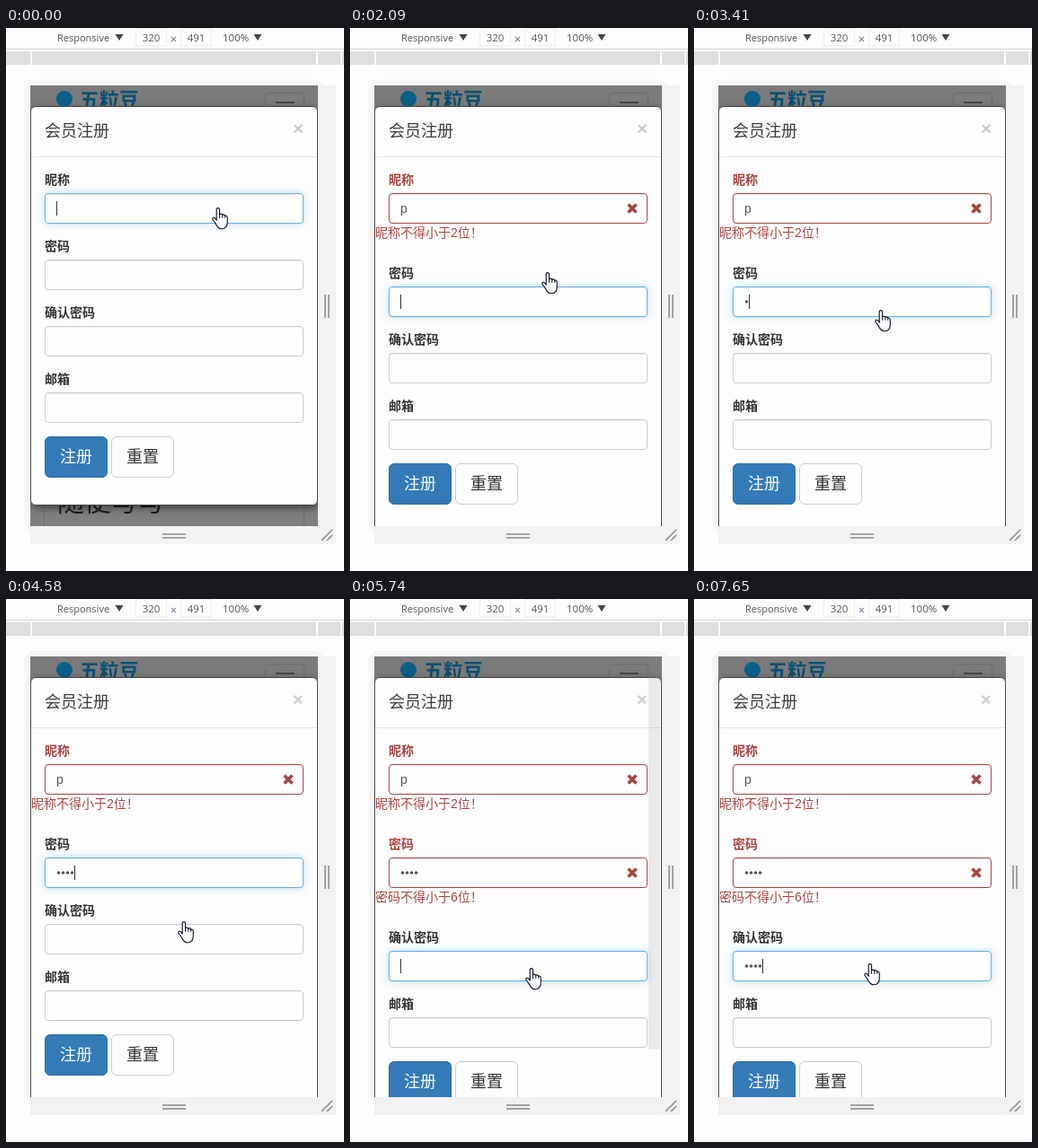
An HTML page with a canvas that plays this animation: 376 by 605 pixels, repeating every 8000 ms.

```html
<!DOCTYPE html>
<html lang="zh-CN">
<head>
<meta charset="utf-8">
<title>会员注册</title>
<style>
html, body { margin: 0; width: 100%; height: 100%; overflow: hidden; background: #fdfdfd; }
canvas { display: block; }
</style>
</head>
<body>
<canvas id="stage" width="376" height="605"></canvas>
<script>
const ctx = document.getElementById('stage').getContext('2d');
const LOOP = 8000, BLINK = 520;
const CJK = '"Liberation Sans", "Noto Sans CJK SC", "Noto Sans CJK", sans-serif';
const UI = '"Open Sans", "Noto Sans", sans-serif';
const PAPER = '#fdfdfd', RED = [169, 68, 66], BLUE = [102, 175, 233], GREY = [204, 204, 204];
const SCREEN = { x: 27, y: 64, w: 320, h: 491 };

// Each field: time of focus, first key, time between keys, key count, caret step
const FIELDS = [
  { label: '昵称', error: '昵称不得小于2位！', focus: 0, key: 510, gap: 0, count: 1, step: 8 },
  { label: '密码', error: '密码不得小于6位！', focus: 1960, key: 3170, gap: 427, count: 4, step: 5 },
  { label: '确认密码', focus: 5230, key: 6260, gap: 420, count: 4, step: 5 },
  { label: '邮箱', focus: Infinity, key: Infinity, gap: 0, count: 0, step: 0 }
];

// Where the hand turns or rests: time, x, y
const STOPS = [
  [0, 229, 200], [510, 217, 271], [1560, 213, 274], [2090, 213, 272], [2600, 201, 356],
  [2850, 194, 324], [3540, 202, 313], [4400, 202, 313], [4580, 191, 359], [4820, 187, 382],
  [5230, 184, 375], [5600, 195, 411], [6260, 191, 411], [7650, 189, 406]
];

const clamp = v => Math.max(0, Math.min(1, v));
const smooth = k => k * k * (3 - 2 * k);
const rgb = c => `rgb(${c.map(Math.round).join(',')})`;
const mix = (a, b, k) => a.map((v, i) => v + (b[i] - v) * k);

function typedCount(f, t) {
  if (t < f.key) return 0;
  return f.gap ? Math.min(f.count, 1 + Math.floor((t - f.key) / f.gap)) : f.count;
}
function caretOn(f, t) {
  const n = typedCount(f, t);
  const last = n ? f.key + (n - 1) * f.gap : f.focus;
  return Math.floor((t - last) / BLINK) % 2 === 0;
}
function handAt(t) {
  const next = STOPS.findIndex(s => s[0] > t);
  if (next < 0) return STOPS[STOPS.length - 1].slice(1);
  const a = STOPS[next - 1], b = STOPS[next];
  return mix(a, b, smooth((t - a[0]) / (b[0] - a[0]))).slice(1).map(Math.round);
}

function rect(x, y, w, h, color) {
  ctx.fillStyle = color;
  ctx.fillRect(x, y, w, h);
}
function box(x, y, w, h, r, fill, stroke) {
  ctx.beginPath();
  ctx.roundRect(x + .5, y + .5, w - 1, h - 1, Math.max(0, r - .5));
  if (fill) { ctx.fillStyle = fill; ctx.fill(); }
  if (stroke) { ctx.strokeStyle = stroke; ctx.lineWidth = 1; ctx.stroke(); }
}
function text(s, x, y, font, color, align = 'left') {
  ctx.font = font;
  ctx.fillStyle = color;
  ctx.textAlign = align;
  ctx.fillText(s, x, y);
}
function line(x1, y1, x2, y2, color, width) {
  ctx.strokeStyle = color;
  ctx.lineWidth = width;
  ctx.beginPath();
  ctx.moveTo(x1, y1);
  ctx.lineTo(x2, y2);
  ctx.stroke();
}
function disc(x, y, r, color) {
  ctx.fillStyle = color;
  ctx.beginPath();
  ctx.arc(x, y, r, 0, Math.PI * 2);
  ctx.fill();
}
function triangle(x, y) {
  ctx.fillStyle = '#444';
  ctx.beginPath();
  ctx.moveTo(x, y);
  ctx.lineTo(x + 9, y);
  ctx.lineTo(x + 4.5, y + 7);
  ctx.fill();
}

function toolbar() {
  rect(0, 0, 376, 605, PAPER);
  text('Responsive', 57, 15, '11px ' + UI, '#555');
  triangle(121.5, 7);
  for (const [size, x] of [['320', 144], ['491', 194]]) {
    box(x, 0, 35, 20, 0, null, '#eee');
    text(size, x + 17.5, 15, '11.5px ' + UI, '#555', 'center');
  }
  text('×', 186.5, 17, '13px ' + UI, '#7c5a86', 'center');
  text('100%', 241, 15, '11.5px ' + UI, '#555');
  triangle(275.5, 7);
  rect(0, 23, 376, 1, '#d0d0d0');
  rect(0, 26, 376, 15, '#dedede');
  for (const x of [27, 345, 372]) rect(x, 26, 2, 15, PAPER);
}

function frame() {
  box(20, 57, 334, 505, 12, '#f5f5f5');
  rect(347, 64, 20, 511, '#f2f2f2');
  rect(27, 555, 340, 20, '#f2f2f2');
  for (const d of [0, 4]) {
    line(355 + d, 297, 355 + d, 323, '#a0a0a0', 2);
    line(174, 564 + d, 200, 564 + d, '#a0a0a0', 2);
    line(351 + d * 1.5, 571, 363, 559 + d * 1.5, '#8c8c8c', 1.6);
  }
}

function backdrop() {
  rect(SCREEN.x, SCREEN.y, SCREEN.w, SCREEN.h, '#7e7e7e');
  rect(SCREEN.x, SCREEN.y, SCREEN.w, 50, '#7b7b7b');
  disc(65, 79, 9, '#0a5f88');
  text('五粒豆', 82, 88, 'bold 22px ' + CJK, '#0a4f72');
  box(288, 72, 44, 34, 4, null, '#6b6b6b');
  rect(300, 82, 21, 2, '#444');
  box(42, 490, 290, 90, 3, null, '#707070');
  text('随便写写', 57, 538, '30px ' + CJK, '#1b1b1b');
}

function field(label, y, glow, error) {
  text(label, 43, y - 10, 'bold 14px ' + CJK, error ? rgb(RED) : '#333');
  ctx.save();
  if (glow) {
    ctx.shadowColor = `rgba(${BLUE},${.5 * glow})`;
    ctx.shadowBlur = 8;
  }
  box(43, y, 288, 34, 4, PAPER);
  ctx.restore();
  rect(46, y + 1, 282, 1, 'rgba(0,0,0,.05)');
  box(43, y, 288, 34, 4, null, rgb(mix(error ? RED : GREY, BLUE, glow)));
  if (error) {
    for (const d of [-4.5, 4.5]) line(314 - d, y + 12.5, 314 + d, y + 21.5, rgb(RED), 3.6);
    text(error, 28, y + 49, '14px ' + CJK, rgb(RED));
  }
}

function button(label, x, y, font, fill, border, color) {
  box(x, y, 70, 46, 6, fill, border);
  text(label, x + 35, y + 29, font + CJK, color, 'center');
}

function modal(t, active) {
  const shift = active * 30;
  const since = t - FIELDS[active].focus;
  const fade = active ? smooth(clamp((since + 45) / 150)) : 1;
  const top = i => 184 + 74 * i + 30 * Math.min(i, active);

  ctx.save();
  ctx.shadowColor = 'rgba(0,0,0,.5)';
  ctx.shadowBlur = 9;
  ctx.shadowOffsetY = 3;
  box(27, 87, 320, 445 + shift, 6, PAPER);
  ctx.restore();
  box(27, 87, 320, 445 + shift, 6, PAPER, '#484848');

  text('会员注册', 43, 121, '18px ' + CJK, '#3c3c3c');
  text('×', 325, 118.5, 'bold 21px ' + CJK, '#ccc', 'center');
  rect(28, 143, 318, 1, '#e5e5e5');

  FIELDS.forEach((f, i) => {
    const y = top(i), n = typedCount(f, t);
    const glow = i === active ? fade : i === active - 1 ? 1 - fade : 0;
    field(f.label, y, glow, i < active && f.error);
    if (i === 0 && n) text('p', 56, y + 22, '14px ' + CJK, '#555');
    if (i > 0) for (let k = 0; k < n; k++) disc(58.5 + k * 5, y + 17, 1.8, '#555');
    if (i === active && caretOn(f, t)) rect(56 + n * f.step, y + 9, 1, 16, '#333');
  });

  button('注册', 43, 455 + shift, '500 18px ', '#337ab7', '#2e6da4', '#fff');
  button('重置', 117, 455 + shift, '18px ', PAPER, '#ccc', '#333');

  if (active === 0 && typedCount(FIELDS[0], t)) {
    box(43, 218, 288, 26, 0, PAPER, '#c0c4c6');
    text('pum', 52, 236, 'bold 13px ' + UI, '#000');
  }
}

// Shows for a moment after the content has grown
function scrollbar(t, active) {
  const age = t - FIELDS[active].focus - 510;
  if (!active || age < 0 || age > 250) return;
  const height = SCREEN.h * SCREEN.h / (SCREEN.h + 30 * active);
  rect(332, SCREEN.y, 13, height, `rgba(128,128,128,${.16 * (1 - age / 250)})`);
}

const HAND = new Path2D('M5 14V2.2Q5 .6 6.6 .6Q8.2 .6 8.2 2.2V8Q8.5 7 9.7 7Q11.1 7 11.3 8.3' +
  'Q11.6 7.6 12.7 7.7Q14 7.9 14.1 9.2Q14.5 8.7 15.3 9Q16.6 9.4 16.6 10.8V16' +
  'Q16.6 23.3 10.8 23.3Q7.3 23.3 5.4 20Q4 17 .9 13.2Q.3 11.8 1.4 11.1Q2.5 10.7 3.4 11.6Z');
function hand(t) {
  const ink = '#14142a';
  ctx.save();
  ctx.translate(...handAt(t));
  ctx.scale(1.04, 1.02);
  ctx.lineJoin = 'round';
  ctx.fillStyle = '#fff';
  ctx.fill(HAND);
  ctx.strokeStyle = ink;
  ctx.lineWidth = 1.1;
  ctx.stroke(HAND);
  for (const x of [8.2, 11.3, 14.1]) line(x, 8, x, 11.5, ink, 1);
  ctx.restore();
}

function draw(t) {
  const active = FIELDS.filter(f => f.focus <= t).length - 1;
  toolbar();
  frame();
  ctx.save();
  ctx.beginPath();
  ctx.rect(SCREEN.x, SCREEN.y, SCREEN.w, SCREEN.h);
  ctx.clip();
  backdrop();
  modal(t, active);
  scrollbar(t, active);
  ctx.restore();
  hand(t);
}

const start = performance.now();
function tick() {
  draw(Math.max(0, performance.now() - start) % LOOP);
  requestAnimationFrame(tick);
}
tick();
</script>
</body>
</html>
```
